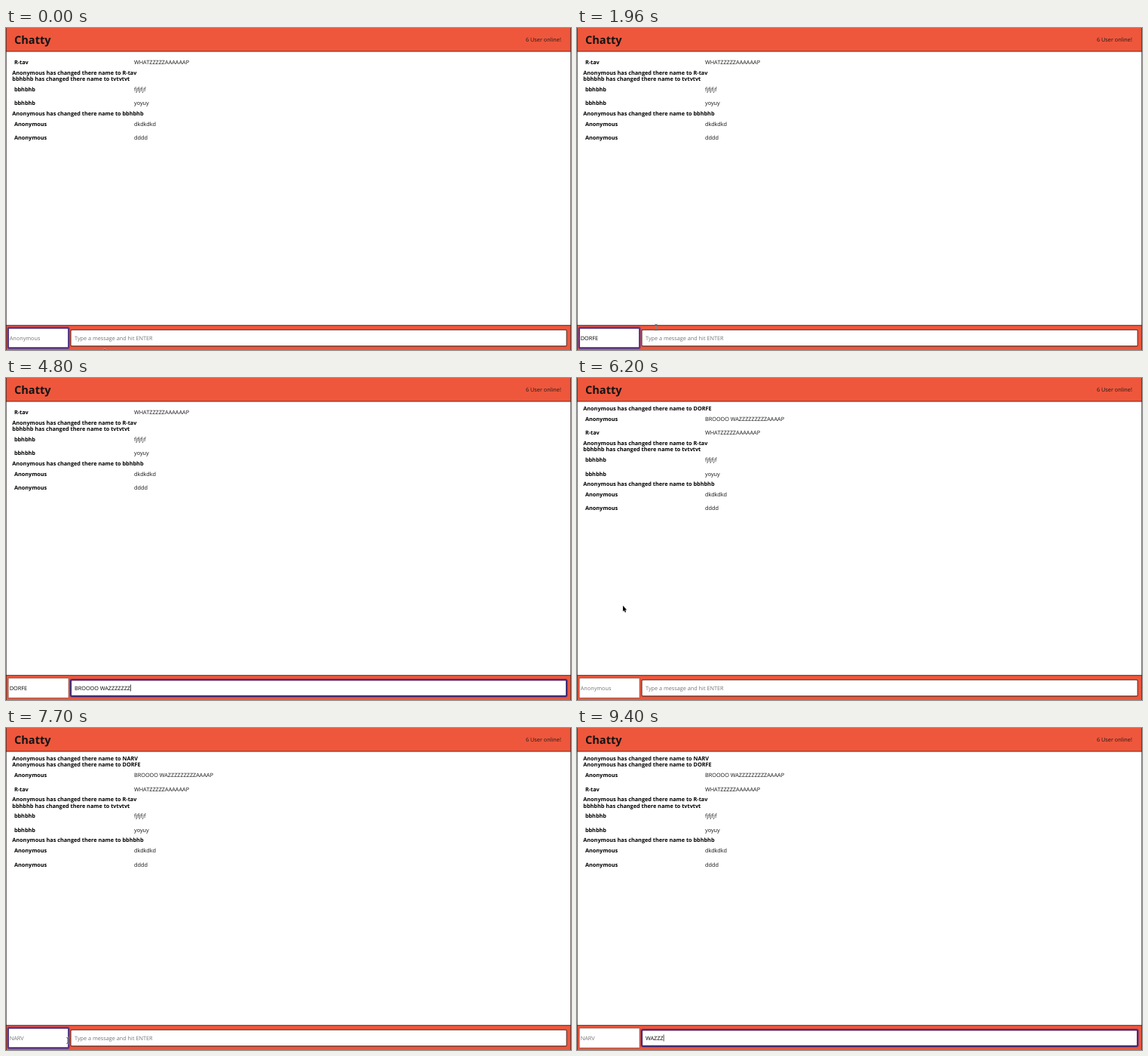
An HTML page with a canvas for the animation above (9420 ms loop, 750x427 px).

```html
<!DOCTYPE html>
<html lang="en">
<head>
<meta charset="utf-8">
<title>Chatty</title>
<style>
  html, body { margin: 0; width: 100%; height: 100%; overflow: hidden; background: #fff; }
  canvas { display: block; width: 750px; height: 427px; }
</style>
</head>
<body>
<canvas id="stage" width="750" height="427"></canvas>
<script>
const ctx = document.getElementById('stage').getContext('2d');
const LOOP = 9420;
const ORANGE = '#ee573c';
const GREY = '#757575';
const FONT = '"Open Sans", "Noto Sans", sans-serif';
const SIZE = 7.29;

const USERS = { first: 'DORFE', second: 'NARV', a: 'R-tav', b: 'bbhbhb', c: 'tvtvtvt' };
const SHOUT = 'BROOOO WAZZZZZZZZZAAAAP';

// Moments of the session, in ms
const T = {
  name1: 860, focusMsg1: 2440, popup: 2640, msg1: 3260, send1: 5700,
  focusName: 6640, name2: 6780, send2: 7200, focusMsg2: 8500, msg2: 8900
};

const renamed = (from, to) => ({ note: `${from} has changed there name to ${to}` });
const said = (who, text) => ({ who, text });

const history = [
  said(USERS.a, 'WHATZZZZZAAAAAAP'),
  renamed('Anonymous', USERS.a),
  renamed(USERS.b, USERS.c),
  said(USERS.b, 'fjfjfjf'),
  said(USERS.b, 'yoyuy'),
  renamed('Anonymous', USERS.b),
  said('Anonymous', 'dkdkdkd'),
  said('Anonymous', 'dddd')
];
const afterFirst = [renamed('Anonymous', USERS.first), said('Anonymous', SHOUT), ...history];
const afterSecond = [renamed('Anonymous', USERS.second), ...afterFirst];

// Pointer runs: [time, x, y]; the pointer is hidden between runs
const runs = [
  [[0, 131, 430], [T.name1, 131, 430]],
  [[1740, 131, 430], [1960, 105, 397], [2360, 118, 418], [T.msg1, 118, 418]],
  [[5780, 118, 418], [6180, 61, 302], [6260, 61, 302], [6580, 70, 412], [T.name2, 70, 412]],
  [[7400, 70, 412], [7680, 82, 414.5], [7800, 82, 414.5], [8360, 130, 412], [T.msg2, 130, 412]]
];

function text(str, x, y, color = '#000', weight = 400, size = SIZE) {
  ctx.font = `${weight} ${size}px ${FONT}`;
  ctx.fillStyle = color;
  ctx.fillText(str, x, y);
  return ctx.measureText(str).width;
}

function rect(x, y, w, h, color) {
  ctx.fillStyle = color;
  ctx.fillRect(x, y, w, h);
}

function box(x, y, w, h, r, fill, stroke, line) {
  ctx.beginPath();
  ctx.roundRect(x, y, w, h, r);
  if (fill) {
    ctx.fillStyle = fill;
    ctx.fill();
  }
  if (stroke) {
    ctx.strokeStyle = stroke;
    ctx.lineWidth = line;
    ctx.stroke();
  }
}

// Typed part of a string and the time of its last key
function typing(str, start, step, t) {
  const count = t < start ? 0 : Math.min(str.length, Math.floor((t - start) / step) + 1);
  return { value: str.slice(0, count), last: start + (count - 1) * step };
}

function inputState(t) {
  const s = { name: '', hint: 'Anonymous', msg: '', focus: null, key: 0 };
  if (t < T.focusMsg1) {
    const k = typing(USERS.first, T.name1, 145, t);
    Object.assign(s, { name: k.value, focus: 'name', key: k.value ? k.last : -600 });
  } else if (t < T.send1) {
    const k = typing(SHOUT, T.msg1, 100, t);
    Object.assign(s, { name: USERS.first, msg: k.value, focus: 'msg', key: k.value ? k.last : T.focusMsg1 });
  } else if (t >= T.focusName && t < T.send2) {
    const k = typing(USERS.second, T.name2, 100, t);
    Object.assign(s, { name: k.value, focus: 'name', key: k.value ? k.last : T.focusName });
  } else if (t >= T.send2) {
    s.hint = USERS.second;
    s.focus = t < T.focusMsg2 ? 'name' : 'msg';
    const k = typing('WAZZZ', T.msg2, 110, t);
    s.msg = k.value;
    s.key = k.value ? k.last : t < T.focusMsg2 ? T.send2 - 20 : T.focusMsg2;
  }
  return s;
}

function field(x, value, hint, caret) {
  const y = 413.5;
  let end = x;
  if (value) end += text(value, x, y);
  else text(hint, x, y, GREY);
  if (caret) rect(end + 0.2, 406.5, 0.7, 9, '#000');
}

function drawHeader() {
  rect(0, 0, 750, 31, ORANGE);
  rect(0, 30.6, 750, 0.9, '#4a2018');
  text('Chatty', 11, 21.4, '#141414', 700, 14.58);
  text('6 User online!', 690, 17.7, '#1c1c1c');
}

function drawChat(t) {
  const rows = t < T.send1 ? history : t < T.send2 ? afterFirst : afterSecond;
  let y = 36.6;
  for (const row of rows) {
    if (row.note) {
      text(row.note, 8.3, y + 6.4, '#000', 700);
      y += 8.36;
    } else {
      text(row.who, 10.9, y + 11.6, '#000', 700);
      text(row.text, 170, y + 11.6, '#111');
      y += 18.75;
    }
  }
}

function drawFooter(t) {
  const s = inputState(t);
  const caretOn = Math.floor((t - s.key) / 500) % 2 === 0;
  const onName = s.focus === 'name', onMsg = s.focus === 'msg';

  rect(0, 394, 750, 33, ORANGE);
  rect(0, 393.8, 750, 0.9, '#4a2018');

  if (onName) {
    box(2.6, 397.4, 80.8, 27.2, 1.5, '#fff', '#8f3f78', 2.6);
    box(3, 397.8, 80, 26.4, 1, null, '#43378a', 1.4);
  } else {
    box(3, 397.9, 80.2, 26.4, 0.5, '#fff', '#8d4a3c', 0.9);
  }
  field(4.7, s.name, s.hint, onName && caretOn);

  if (onMsg) {
    box(85.8, 400.1, 658.6, 22, 1.5, '#fff', '#8f3f78', 2.6);
    box(86, 400.3, 658.2, 21.6, 1.5, null, '#2f2870', 1.6);
  } else {
    box(86, 400.2, 658.2, 21.7, 1.5, '#fff', '#5a2a20', 1.1);
  }
  field(91, s.msg, 'Type a message and hit ENTER', onMsg && caretOn);

  if (t >= T.popup && t < T.msg1) {
    box(85.8, 372.8, 100, 26.6, 1.5, '#222829', '#34363a', 0.6);
    ctx.font = '600 6.8px Inter, sans-serif';
    ctx.fillStyle = '#e8eaea';
    ctx.fillText('kkk', 92, 388.5);
  }
}

function drawEdges() {
  rect(0, 0, 0.8, 427, 'rgba(40,30,30,.75)');
  rect(749.2, 0, 0.8, 427, 'rgba(40,30,30,.75)');
}

function pointerAt(t) {
  const run = runs.find(r => t >= r[0][0] && t < r[r.length - 1][0]);
  if (!run) return null;
  const i = run.findIndex(p => t < p[0]);
  const [t0, x0, y0] = run[i - 1];
  const [t1, x1, y1] = run[i];
  const u = (t - t0) / (t1 - t0);
  const e = u * u * (3 - 2 * u);
  return [x0 + (x1 - x0) * e, y0 + (y1 - y0) * e];
}

function drawPointer(t) {
  const at = pointerAt(t);
  if (!at) return;
  ctx.save();
  ctx.translate(at[0], at[1]);
  ctx.lineJoin = 'round';
  ctx.beginPath();
  if (at[1] > 392) {
    ctx.moveTo(-1.6, -4);
    ctx.quadraticCurveTo(0, -4, 0, -2.8);
    ctx.quadraticCurveTo(0, -4, 1.6, -4);
    ctx.moveTo(0, -3);
    ctx.lineTo(0, 3);
    ctx.moveTo(-1.6, 4);
    ctx.quadraticCurveTo(0, 4, 0, 2.8);
    ctx.quadraticCurveTo(0, 4, 1.6, 4);
    ctx.strokeStyle = 'rgba(255,255,255,.6)';
    ctx.lineWidth = 1.9;
    ctx.stroke();
    ctx.strokeStyle = '#333';
    ctx.lineWidth = 0.9;
    ctx.stroke();
  } else {
    [[0, 0], [0, 7.6], [1.6, 6.1], [2.8, 8.7], [4, 8.2], [2.9, 5.6], [5, 5.5]]
      .forEach(p => ctx.lineTo(p[0], p[1]));
    ctx.closePath();
    ctx.strokeStyle = 'rgba(225,225,225,.9)';
    ctx.lineWidth = 1.2;
    ctx.stroke();
    ctx.fillStyle = '#000';
    ctx.fill();
  }
  ctx.restore();
}

function draw(t) {
  ctx.textRendering = 'geometricPrecision';
  rect(0, 0, 750, 427, '#fff');
  drawHeader();
  drawChat(t);
  drawFooter(t);
  drawEdges();
  drawPointer(t);
}

const begin = performance.now();
function tick() {
  draw((performance.now() - begin) % LOOP);
  requestAnimationFrame(tick);
}
tick();
</script>
</body>
</html>
```
